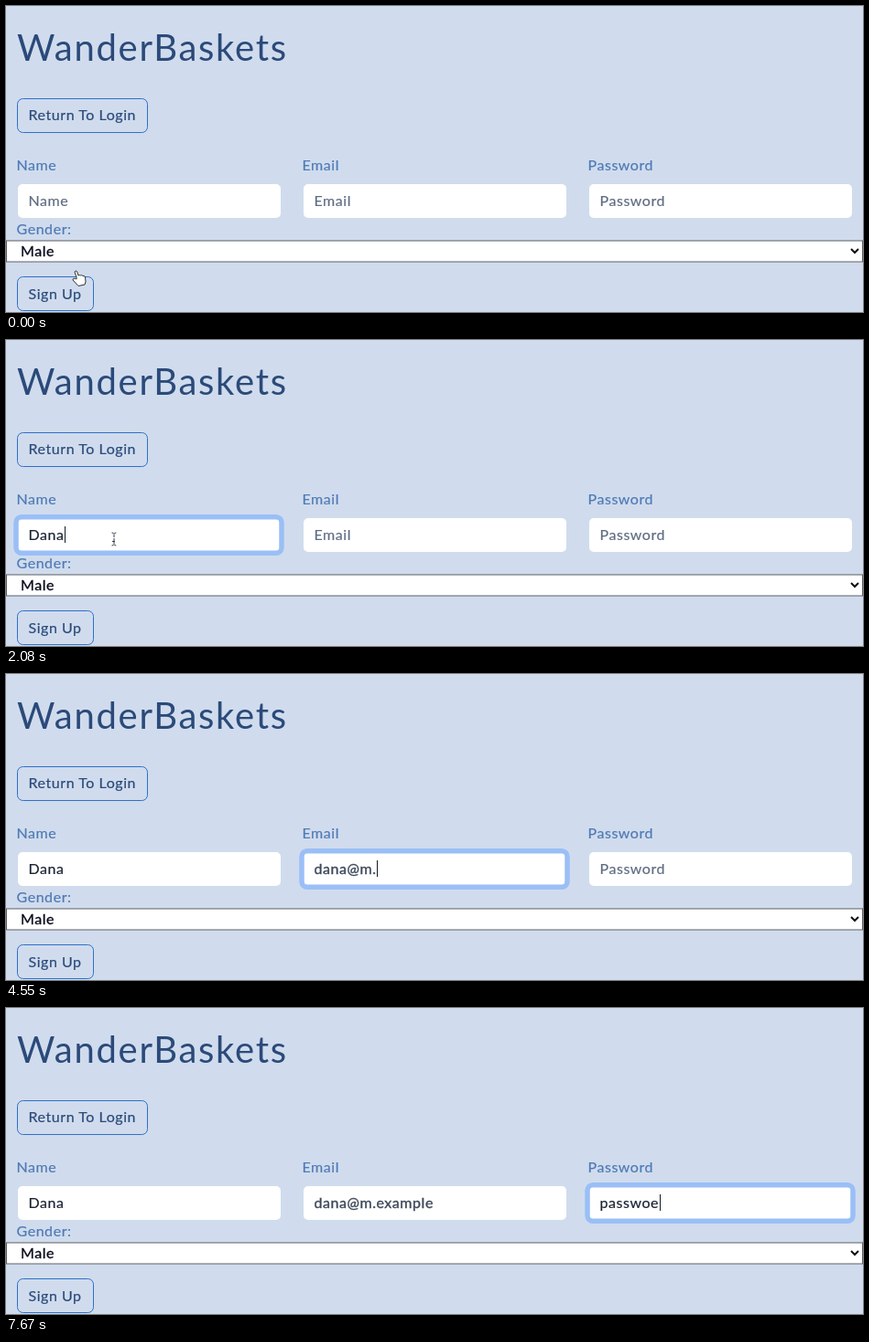
Animation, 936 px wide and 335 px high, one loop 8 s. Source, as an HTML page:

```html
<!DOCTYPE html>
<html lang="en">
<head>
<meta charset="utf-8">
<title>Sign up form</title>
<style>
  html, body { margin: 0; width: 100%; height: 100%; overflow: hidden; background: #d0dced; }
  svg { display: block; }
  text { font: 16px Lato, "Open Sans", sans-serif; letter-spacing: .55px; fill: #2b4a7a; stroke: #2b4a7a; stroke-width: .2px; white-space: pre; }
  .title { font-size: 40px; letter-spacing: 1.7px; stroke: none; }
  .label { fill: #4f7ab6; stroke: #4f7ab6; }
  .value { fill: #1a2433; stroke: #1a2433; }
  .email { fill: #3c485a; stroke: #3c485a; stroke-width: .4px; }
  .hint { fill: #5f6d82; stroke: #5f6d82; }
  .option { fill: #06091a; stroke: #06091a; stroke-width: .3px; }
  .button { fill: none; stroke: #2f6fc8; }
  .mouse { fill: #fff; stroke: #333; }
</style>
</head>
<body>
<svg id="stage" width="936" height="335" viewBox="0 0 936 335">
  <text class="title" x="12" y="60">WanderBaskets</text>
  <rect class="button" x="12.5" y="101.5" width="142" height="37" rx="6"/>
  <text x="24.5" y="125">Return To Login</text>
  <g id="fields"></g>
  <text class="label" x="11.5" y="249.5">Gender:</text>
  <rect x=".5" y="257" width="935" height="23" fill="#fff" stroke="#5c6066"/>
  <text class="option" x="16" y="273.5">Male</text>
  <path d="M923 266l4 4 4-4" fill="none" stroke="#111" stroke-width="2"/>
  <rect class="button" x="12.5" y="296.5" width="83" height="37" rx="6"/>
  <text x="24.5" y="320.5">Sign Up</text>
  <path id="caret" d="M0 204v18" stroke="#111a28"/>
  <path id="hand" class="mouse" d="M-3 0L-5-6Q-4-8-2.500-6.500L-1-2Q0-3 1.500-2 3-3 4-1.500 6-2 6.500 0L7 5 6 8-1 9.500-7 3Q-7 0-3 2Z"/>
  <path id="arrow" class="mouse" d="M-4-7V6L-1 3 1 8 3 7 1 2.500H5Z"/>
  <path id="beam" d="M-2.500-7Q0-7 0-5 0-7 2.500-7M0-5V5M-2.500 7Q0 7 0 5 0 7 2.500 7M-2 2.500H2" fill="none" stroke="#333d4d" stroke-dasharray="3 1"/>
</svg>
<script>
const LOOP = 8000, STEP = 130;
const byId = id => document.getElementById(id);

const fields = [
  { label: "Name", x: 12, style: "value", text: "Dana", from: 780, to: 2470,
    keys: [1430, 1690, 1950, 2080] },
  { label: "Email", x: 324, style: "value email", text: "dana@m.example", from: 2470, to: 6240,
    keys: [2730, 2990, 3120, 3250, 4160, 4290, 4550, 4680, 4940, 5200, 5330, 5460, 5590, 5590] },
  { label: "Password", x: 636, style: "value", text: "passwoe", from: 6240, to: LOOP,
    keys: [6500, 6630, 6890, 7020, 7150, 7280, 7670] }
];

// Pointer stops: time, x, y, shape
const stops = [
  [0, 80, 297, "hand"], [130, 82, 295, "hand"], [390, 91, 278, "arrow"],
  [520, 106, 246, "arrow"], [650, 116, 220, "beam"], [780, 118, 218, "beam"], [2600, 0, 0, ""]
];

function add(tag, attrs, content = "") {
  const node = document.createElementNS("http://www.w3.org/2000/svg", tag);
  for (const name in attrs) node.setAttribute(name, attrs[name]);
  node.textContent = content;
  return byId("fields").appendChild(node);
}

for (const f of fields) {
  add("text", { class: "label", x: f.x - .5, y: 180 }, f.label);
  add("rect", { x: f.x + 1, y: 195, width: 287, height: 37, rx: 5, fill: "#fff" });
  f.glow = add("rect", { x: f.x - 1, y: 193.75, width: 290, height: 39.5, rx: 6,
    fill: "none", stroke: "#9abff6", "stroke-width": 5.5 });
  f.node = add("text", { x: f.x + 12.5, y: 219 });
}

function draw(t) {
  let caretX = null;
  for (const f of fields) {
    const typed = f.keys.filter(k => k <= t);
    const active = t >= f.from && t < f.to;
    const fadeIn = Math.min(1, .45 + (t - f.from) / 400);
    f.glow.setAttribute("opacity", active ? fadeIn : t >= f.to && t < f.to + STEP ? .5 : 0);
    f.node.textContent = typed.length ? f.text.slice(0, typed.length) : f.label;
    f.node.setAttribute("class", typed.length ? f.style : "hint");
    const lastInput = typed.length ? typed[typed.length - 1] : f.from;
    if (active && (t - lastInput) % 1040 < 520)
      caretX = f.x + 13 + (typed.length ? f.node.getComputedTextLength() : 0);
  }
  byId("caret").setAttribute("visibility", caretX === null ? "hidden" : "visible");
  byId("caret").setAttribute("transform", `translate(${Math.round(caretX) + .5})`);

  const [, x, y, shape] = stops.filter(s => s[0] <= t).pop();
  for (const id of ["hand", "arrow", "beam"]) {
    byId(id).setAttribute("visibility", id === shape ? "visible" : "hidden");
    byId(id).setAttribute("transform", `translate(${x} ${y})`);
  }
}

const start = performance.now();
function tick(now) {
  const t = Math.max(0, now - start) % LOOP;
  draw(Math.floor(t / STEP) * STEP);
  requestAnimationFrame(tick);
}
tick(start);
</script>
</body>
</html>
```
